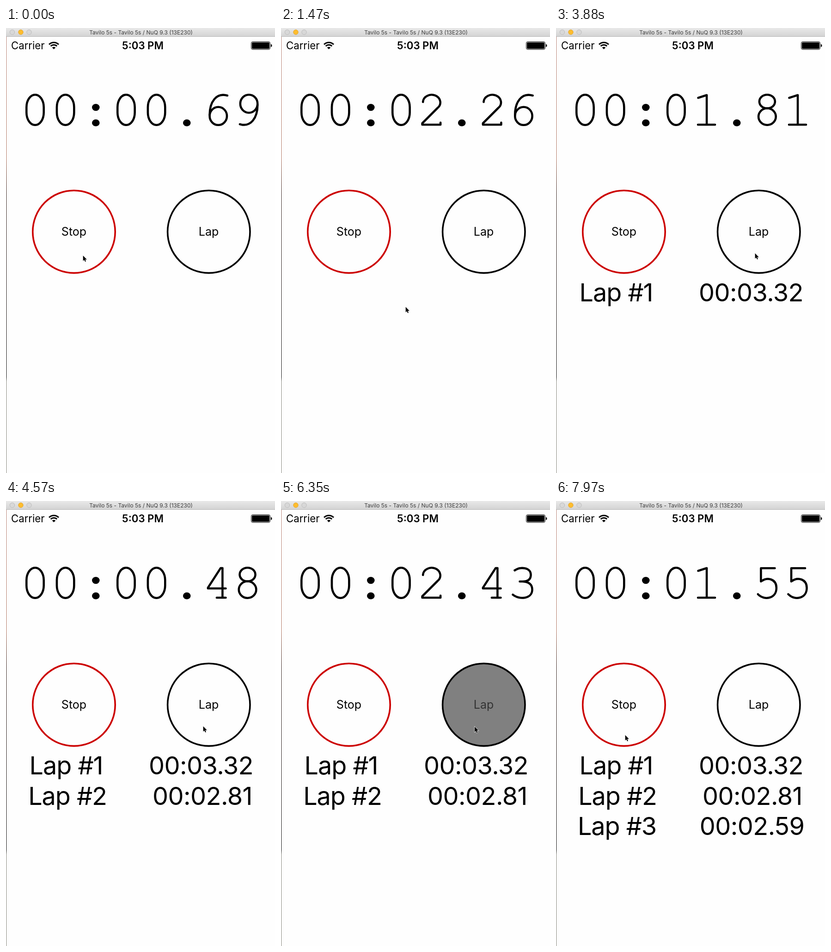
Recreate the animation shown at these times as an HTML page. Size 582x962 px, loop 8 s.

```html
<!DOCTYPE html>
<html lang="en">
<head>
<meta charset="utf-8">
<title>Stopwatch</title>
<style>
  html, body { margin: 0; width: 100%; height: 100%; overflow: hidden; background: #fefefe; }
  svg { display: block; width: 582px; height: 962px; font-family: Inter, Roboto, sans-serif; }
  .mid { text-anchor: middle; }
  .status { font-size: 22.2px; }
  .button circle { fill: #fefefe; stroke: #000; stroke-width: 3.6; }
  .button text { font-size: 25px; text-anchor: middle; }
  .pressed circle { fill: #808080; }
  .pressed text { fill: #333; }
  #laps { font-size: 54px; letter-spacing: -.01em; text-anchor: middle; }
  #laps .label { letter-spacing: -.02em; }
  #clock { fill: none; stroke: #000; stroke-width: 4.6; stroke-linecap: round; stroke-linejoin: round; }
</style>
</head>
<body>
<svg viewBox="0 0 582 962">
  <defs>
    <linearGradient id="bar" x2="0" y2="1">
      <stop stop-color="#e9e9e9"/><stop offset="1" stop-color="#d2d2d2"/>
    </linearGradient>
    <linearGradient id="edge" x2="0" y2="1">
      <stop stop-color="#b98478"/><stop offset=".28" stop-color="#b0745f"/>
      <stop offset=".36" stop-color="#3c2a26"/><stop offset=".78" stop-color="#101010"/>
      <stop offset=".79" stop-color="#85857c"/>
    </linearGradient>
  </defs>

  <rect y="19" width="1" height="943" fill="url(#edge)"/>
  <rect width="582" height="19" fill="url(#bar)"/>
  <rect y="18" width="582" height="1" fill="#b8b8b8"/>
  <g fill="#d8d8d8" stroke="#bcbcbc">
    <circle cx="13.5" cy="9" r="5.2"/>
    <circle cx="32" cy="9" r="5.2" fill="#fdbd2e" stroke="#e2a633"/>
    <circle cx="50" cy="9" r="5.2"/>
  </g>
  <text class="mid" x="292" y="14" font-size="12" fill="#3c3c3c">Tavilo 5s - Tavilo 5s / NuQ 9.3 (13E230)</text>

  <g class="status">
    <text x="11" y="46">Carrier</text>
    <text class="mid" x="296" y="46" font-weight="600">5:03 PM</text>
  </g>
  <g transform="translate(103.5 46)" fill="none" stroke="#000" stroke-width="3">
    <path d="M-10.4-10.4A14.8 14.8 0 0 1 10.4-10.4M-6.7-6.7A9.5 9.5 0 0 1 6.7-6.7"/>
    <path d="M0 0L-3.8-3.8A5.4 5.4 0 0 1 3.8-3.8Z" fill="#000" stroke="none"/>
  </g>
  <rect x="530.5" y="29.5" width="41" height="17" rx="3.5" fill="none" stroke="#000"/>
  <rect x="532" y="31" width="38" height="14" rx="2"/>
  <path d="M573 35Q575.5 35 575.5 38T573 41Z"/>

  <g id="clock"></g>

  <g class="button">
    <circle cx="147" cy="440.4" r="89.2" style="stroke:#c00"/>
    <text x="147" y="449">Stop</text>
  </g>
  <g class="button" id="lapButton">
    <circle cx="438.8" cy="440.4" r="89.2"/>
    <text x="438.5" y="449">Lap</text>
  </g>
  <g id="laps"></g>

  <path id="cursor" d="M.7 1V12.6L3.3 10.2 5.1 14.3 7 13.4 5.3 9.4H8.9Z" stroke="#fff" stroke-width="1.2" paint-order="stroke"/>
</svg>

<script>
const LOOP = 8000, TICK = 10;
const PITCH = 65.65, FIRST_CENTER = 63;
const HOLD = 230;        // how long the lap button stays down
const FREEZE = 30;       // a finished lap time stays on the clock this long
const ROW_HEIGHT = 65.5, FIRST_ROW = 591, COLUMN_GAP = 292;

// Single-line glyphs, x measured from the centre of the cell
const stroke = d => `<path d="${d}"/>`;
const oval = (cx, cy, rx, ry) => `<ellipse cx="${cx}" cy="${cy}" rx="${rx}" ry="${ry}"/>`;
const dot = y => `<g fill="#000" stroke="none">${oval(0, y, 8.3, 7.6)}</g>`;
const six = stroke('M22 146C-2 139-16.3 160-16.3 188') + oval(2.4, 190.3, 18.7, 19.5);
const glyphs = {
  0: '<rect x="-18.7" y="144.2" width="37.4" height="65.6" rx="18.7" ry="27"/>',
  1: stroke('M-18 151L.5 145V209M-18.5 209h37'),
  2: stroke('M-18.5 160A18.8 16.5 0 1 1 13 173L-20 206V209H19.5V204.5'),
  3: stroke('M-17 150C-4 141 18 144 18 159.5Q18 174 0 174H-6M0 174Q21 175 21 191.5C21 212-7 214-21 202.5'),
  4: stroke('M-1 209H18.5M11.5 209V145H7.5L-20 187.5V189H18.5'),
  5: stroke('M16.5 145.3H-13.5V174C1 163 20 169 20 188C20 211-6 216-20 201.5'),
  6: six,
  7: stroke('M-18 151V145.3H18.5V148.5L2 209'),
  8: oval(0, 159, 17, 14.7) + oval(0, 191.6, 18.8, 18.1),
  9: `<g transform="rotate(180 2.7 177)">${six}</g>`,
  ':': dot(171.6) + dot(205),
  '.': dot(205)
};

// Each run counts from zero at `start`; `rate` is hundredths of a second per ms
const runs = [
  { start: -646, rate: .1068, result: 332, center: 130 },
  { start: 2228, rate: .1096, result: 281, center: 133 },
  { start: 4136, rate: .1096, result: 259, center: 132 },
  { start: 6556, rate: .1096 }
];
const laps = runs.slice(0, -1).map((run, i) => ({ ...run, end: runs[i + 1].start }));

// Pointer stops: [ms, x, y]
const stops = [[0, 166, 491], [800, 222, 602], [1470, 269, 602], [2000, 445, 441], [2730, 445, 441],
  [3100, 440, 631], [3800, 430, 486], [5330, 422, 486], [6570, 418, 487], [7400, 150, 520], [LOOP, 149, 505]];

const byId = id => document.getElementById(id);
const clock = byId('clock'), lapButton = byId('lapButton'), cursor = byId('cursor');

function formatTime(hundredths) {
  const pad = n => String(n).padStart(2, '0');
  const seconds = Math.floor(hundredths / 100);
  return `${pad(Math.floor(seconds / 60))}:${pad(seconds % 60)}.${pad(hundredths % 100)}`;
}

byId('laps').innerHTML = laps.map(({ result, center }, i) =>
  `<g transform="translate(${center} ${FIRST_ROW + ROW_HEIGHT * i})">` +
  `<text class="label">Lap #${i + 1}</text><text x="${COLUMN_GAP}">${formatTime(result)}</text></g>`).join('');
const lapRows = [...byId('laps').children];

function clockValue(t) {
  const finished = laps.find(lap => t >= lap.end - FREEZE && t < lap.end);
  if (finished) return finished.result;
  const run = runs.findLast(({ start }) => t >= start);
  return Math.round((t - run.start) * run.rate);
}

function drawClock(text) {
  clock.innerHTML = [...text].map((c, i) =>
    `<g transform="translate(${FIRST_CENTER + PITCH * i})">${glyphs[c]}</g>`).join('');
}

function cursorAt(t) {
  const i = stops.findIndex(([time]) => time > t);
  const [t0, x0, y0] = stops[i - 1], [t1, x1, y1] = stops[i];
  const p = (t - t0) / (t1 - t0);
  const eased = p * p * (3 - 2 * p);
  return [x0 + (x1 - x0) * eased, y0 + (y1 - y0) * eased];
}

function render(now) {
  const t = Math.floor(now % LOOP / TICK) * TICK;
  drawClock(formatTime(clockValue(t)));
  lapRows.forEach((row, i) => row.style.display = t >= laps[i].end - FREEZE ? '' : 'none');
  lapButton.classList.toggle('pressed', laps.some(({ end }) => t >= end - HOLD && t < end));
  cursor.setAttribute('transform', `translate(${cursorAt(t)})`);
}

let start;
function frame(now) {
  start ??= now;
  render(now - start);
  requestAnimationFrame(frame);
}
render(0);
requestAnimationFrame(frame);
</script>
</body>
</html>
```
